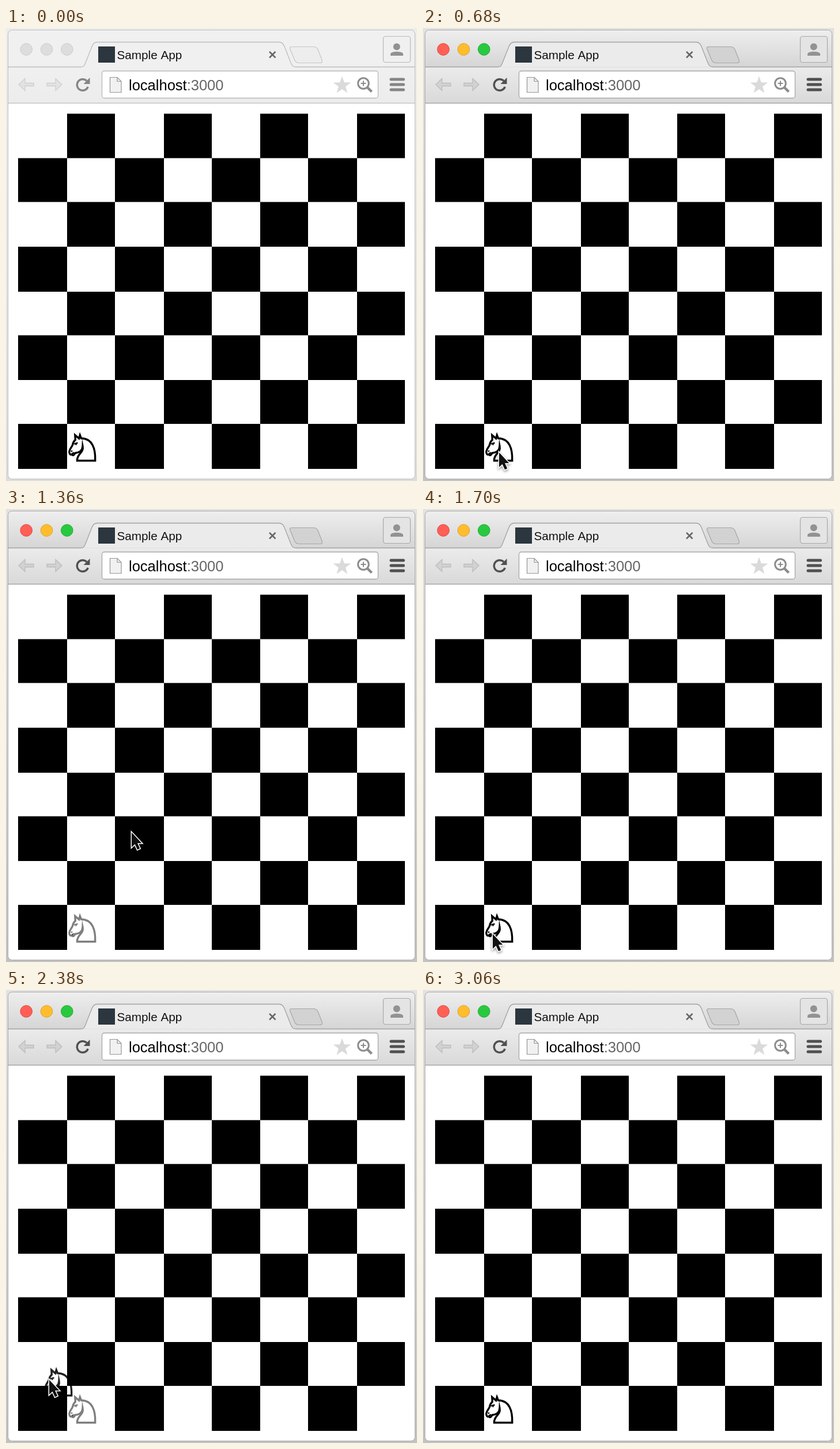
An HTML page with a canvas that plays this animation: 713 by 785 pixels, repeating every 3570 ms.

```html
<!DOCTYPE html>
<html lang="en">
<head>
<meta charset="utf-8">
<title>Knight on a board</title>
<style>
  html, body { margin: 0; width: 100%; height: 100%; overflow: hidden; background: #fff; }
  canvas { display: block; width: 713px; height: 785px; }
</style>
</head>
<body>
<canvas id="stage" width="713" height="785"></canvas>
<script>
const ctx = document.getElementById('stage').getContext('2d');
const STEP = 170, LOOP = 3570;
const HOME = [108, 703];
const FONT = '"Liberation Sans", Arial, sans-serif';
const COLUMNS = [21, 106, 189, 274, 357, 441, 524, 609, 692];
const ROWS = [148.5, 225.5, 301.5, 379, 457, 532.5, 610, 686, 764];

// Each pose holds from its step until the next one.
const poses = [
  { step: 0 },
  { step: 1, cursor: [187, 744] },
  { step: 3, cursor: [186, 744] },
  { step: 4, cursor: [128, 734] },
  { step: 6, cursor: [141, 677], ghost: [125, 665], alpha: 0.5 },
  { step: 7, cursor: [192, 597], ghost: [176, 585] },
  { step: 8, cursor: [214, 559], ghost: [198, 547] },
  { step: 9, cursor: [152, 675] },
  { step: 10, cursor: [117, 735] },
  { step: 11, cursor: [121, 711], ghost: [113, 695], alpha: 0.6 },
  { step: 12, cursor: [117, 566], ghost: [109, 549] },
  { step: 13, cursor: [208, 660], ghost: [203, 622] },
  { step: 14, cursor: [71, 674], ghost: [67, 656] },
  { step: 15, cursor: [175, 600], ghost: [169, 583] },
  { step: 16, cursor: [72, 644], ghost: [66, 628] },
  { step: 17, cursor: [90, 606] },
  { step: 18 }
];

const knightOutline = new Path2D(
  'M15.5 46.7H46.7C47.4 26 42 8.5 22.5 8L20.3 2.5L18.6 8.3L11.8 2.5L12.3 10.5' +
  'C9.5 13 8.2 16 7.5 19.5C6 23.5 2.5 26 1.8 31C1.5 35 4 37.5 6.5 35.5' +
  'C7.5 38.8 10.5 37.5 12 33.5C18 33 24.5 30 25 21.5C27.5 33.5 14.5 34.5 15.5 46.7Z');
const knightDetails = new Path2D('M10.5 18.2Q13.5 16 16.5 16.3M13 18.5L14.5 19M5 31L7 29.6M6.5 35.5L10 32.5');
const arrow = new Path2D('M4 1.5V27L9.6 21.8L14 31.2L18.3 29.2L14 20H21.3Z');

function fill(path, color) {
  ctx.fillStyle = color;
  ctx.fill(path);
}

function stroke(path, color, width = 1) {
  ctx.strokeStyle = color;
  ctx.lineWidth = width;
  ctx.stroke(path);
}

function roundRect(x, y, w, h, r) {
  const path = new Path2D();
  path.roundRect(x, y, w, h, r);
  return path;
}

function circle(x, y, r) {
  const path = new Path2D();
  path.arc(x, y, r, 0, Math.PI * 2);
  return path;
}

function vertical(y0, y1, top, bottom) {
  const gradient = ctx.createLinearGradient(0, y0, 0, y1);
  gradient.addColorStop(0, top);
  gradient.addColorStop(1, bottom);
  return gradient;
}

function text(string, x, y, size, color) {
  ctx.font = `${size}px ${FONT}`;
  ctx.fillStyle = color;
  ctx.fillText(string, x, y);
  return x + ctx.measureText(string).width;
}

function drawFrame(active) {
  ctx.fillStyle = active ? vertical(0, 785, '#e2e2e2', '#c2c2c2') : vertical(0, 785, '#ededed', '#dcdcdc');
  ctx.fillRect(0, 0, 713, 785);
  const frame = roundRect(3.5, 3.5, 706, 778, 7);
  ctx.save();
  ctx.clip(frame);
  ctx.fillStyle = active ? vertical(4, 68, '#eeeeee', '#d5d5d5') : '#f0f0f0';
  ctx.fillRect(0, 0, 713, 68);
  ctx.fillStyle = active ? vertical(68, 130, '#ebebeb', '#d9d9d9') : vertical(68, 130, '#f0f0f0', '#ececec');
  ctx.fillRect(0, 68, 713, 62);
  ctx.fillStyle = '#fff';
  ctx.fillRect(0, 130, 713, 655);
  ctx.fillStyle = active ? '#a9a9a9' : '#c8c8c8';
  ctx.fillRect(0, 129.5, 713, 1.5);
  ctx.restore();
  stroke(frame, active ? '#a6a6a6' : '#bcbcbc');
}

function drawTabs(active) {
  const line = active ? '#a2a2a2' : '#bdbdbd';
  const lights = active
    ? [['#ff5f57', '#e2463f'], ['#ffbd2e', '#e0a023'], ['#28c940', '#1dad2b']]
    : Array(3).fill(['#dddddd', '#cccccc']);
  lights.forEach(([color, rim], i) => {
    const light = circle(35.2 + 35.3 * i, 37, 10.3);
    fill(light, color);
    stroke(light, rim);
  });

  const tab = new Path2D('M4 67.5H130C135 67.5 136 65 138 60L149 32Q152 24.5 158 24.5H474Q480 24.5 483 32L494 60C496 65 498 67.5 503 67.5H709');
  fill(tab, active ? '#ebebeb' : '#f0f0f0');
  stroke(tab, line, 1.3);

  const newTab = new Path2D('M496 32.5H533Q539 32.5 541 37L548 55Q550 60.5 545 60.5H509Q503 60.5 501 56L493 37Q491 32.5 496 32.5Z');
  fill(newTab, active ? '#d2d2d2' : '#ededed');
  stroke(newTab, active ? '#a6a6a6' : '#c6c6c6', 1.2);

  ctx.fillStyle = '#2b363e';
  ctx.fillRect(160, 32, 29, 28);
  text('Sample App', 192.5, 53.5, 20.7, '#111');
  stroke(new Path2D('M457 41L467.5 51.5M467.5 41L457 51.5'), '#666', 2.5);

  const profile = roundRect(654.5, 14.5, 47, 45, 4);
  fill(profile, active ? '#e4e4e4' : '#f0f0f0');
  stroke(profile, active ? '#a8a8a8' : '#b8b8b8', 1.2);
  fill(circle(677.8, 32.5, 6), '#929292');
  fill(new Path2D('M667 48V45C667 39.5 689 39.5 689 45V48Z'), '#929292');
}

function drawToolbar(active) {
  const faint = active ? '#bdbdbd' : '#d0d0d0';
  const dark = active ? '#505050' : '#858585';
  const back = new Path2D('M22 98L33 87.5V95.5H48V100.5H33V108.5Z');
  const forward = new Path2D('M97 98L86 87.5V95.5H71V100.5H86V108.5Z');
  for (const path of [back, forward]) {
    fill(path, active ? '#d2d2d2' : '#e2e2e2');
    stroke(path, faint, 1.3);
  }

  const reload = new Path2D();
  reload.arc(133, 98.5, 9.8, 0.35, 5.5);
  stroke(reload, dark, 3.5);
  fill(new Path2D('M145.5 86V97H134.5Z'), dark);

  const address = roundRect(166.5, 74.5, 479, 47, 4);
  fill(address, '#fff');
  stroke(address, active ? '#a6a6a6' : '#b8b8b8', 1.3);
  const page = new Path2D('M180.5 85.5H193L200 92.5V111.5H180.5Z');
  fill(page, '#f1f1f1');
  stroke(page, '#969696', 1.2);
  stroke(new Path2D('M193 85.5V92.5H200'), '#969696', 1.2);
  const port = text('localhost', 213, 107.5, 25.5, '#000');
  text(':3000', port, 107.5, 25.5, '#666');

  const star = new Path2D();
  for (let i = 0; i < 10; i++) {
    const r = i % 2 ? 6.4 : 16;
    const angle = -Math.PI / 2 + i * Math.PI / 5;
    star.lineTo(583 + r * Math.cos(angle), 99.5 + r * Math.sin(angle));
  }
  star.closePath();
  fill(star, '#dadada');

  stroke(circle(620, 96, 9.3), '#8c8c8c', 3);
  stroke(new Path2D('M620 91.5V100.5M615.5 96H624.5'), '#8c8c8c', 2);
  stroke(new Path2D('M627 103L634.5 110.5'), '#8c8c8c', 4.5);

  ctx.lineCap = 'round';
  stroke(new Path2D('M668 89H689.5M668 98H689.5M668 107H689.5'), dark, 5);
  ctx.lineCap = 'butt';
}

function drawBoard() {
  ctx.fillStyle = '#000';
  for (let row = 0; row < 8; row++) {
    for (let col = 0; col < 8; col++) {
      if ((row + col) % 2 === 0) continue;
      const x = COLUMNS[col], y = ROWS[row];
      ctx.fillRect(x, y, COLUMNS[col + 1] - x, ROWS[row + 1] - y);
    }
  }
}

function drawKnight([x, y], alpha) {
  ctx.save();
  ctx.translate(x, y);
  ctx.globalAlpha = alpha;
  stroke(knightOutline, '#000', 3.4);
  stroke(knightDetails, '#000', 2.4);
  ctx.restore();
}

function drawCursor([x, y]) {
  ctx.save();
  ctx.translate(x, y);
  ctx.lineJoin = 'miter';
  ctx.shadowColor = 'rgba(0, 0, 0, 0.45)';
  ctx.shadowBlur = 4;
  ctx.shadowOffsetY = 2;
  stroke(arrow, '#fff', 3);
  ctx.shadowColor = 'transparent';
  fill(arrow, '#111');
  ctx.restore();
}

function render(now) {
  const step = Math.floor((now % LOOP) / STEP);
  const { cursor, ghost, alpha = 0.87 } = poses.findLast(pose => pose.step <= step);
  const active = step >= 2;
  drawFrame(active);
  drawTabs(active);
  drawToolbar(active);
  drawBoard();
  drawKnight(HOME, ghost ? 0.5 : 1);
  if (ghost) drawKnight(ghost, alpha);
  if (cursor) drawCursor(cursor);
}

let start;
function tick(now) {
  start ??= now;
  render(now - start);
  requestAnimationFrame(tick);
}
render(0);
requestAnimationFrame(tick);
</script>
</body>
</html>
```
